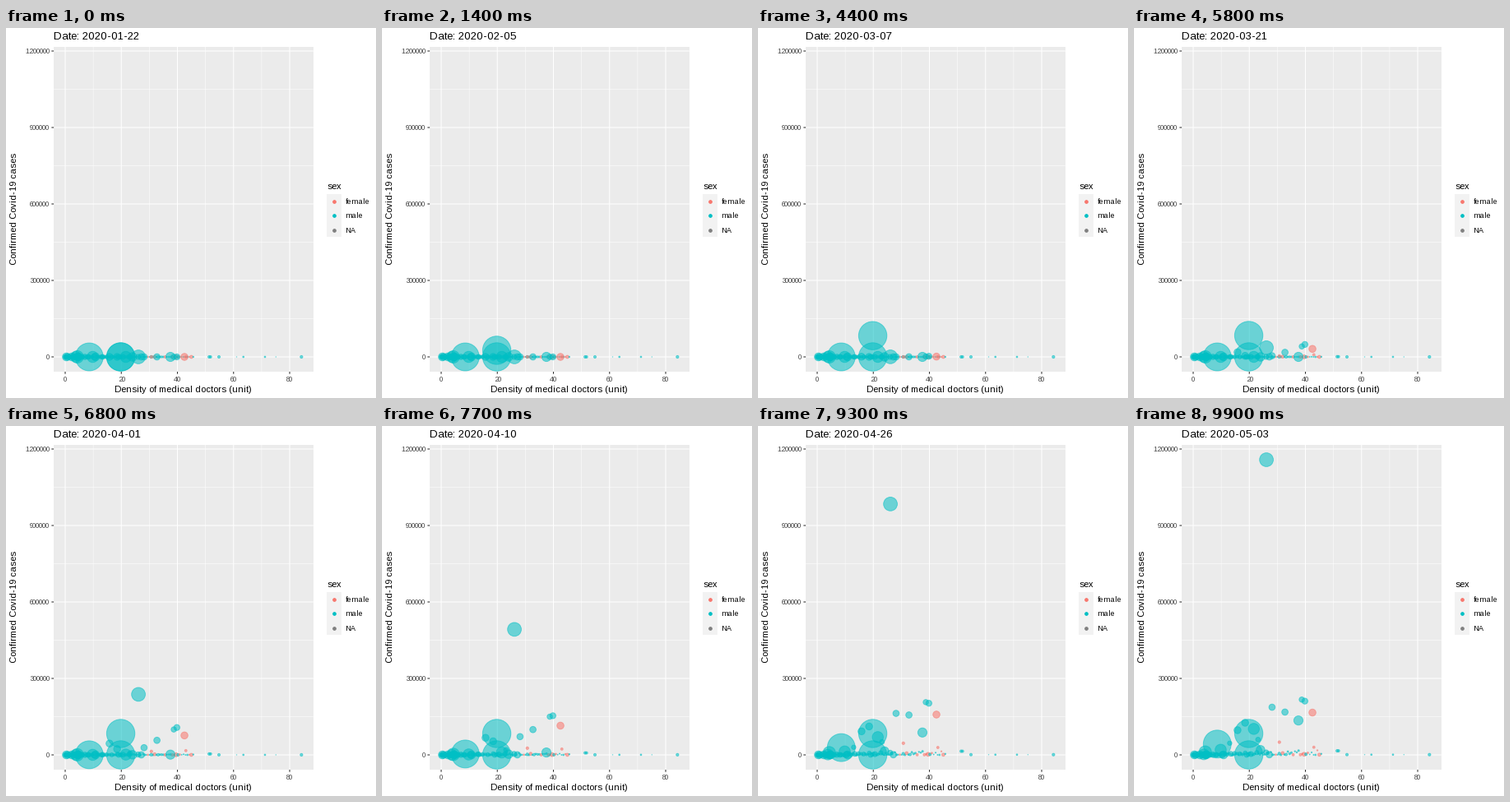
Animation, 450 px wide and 450 px high, one loop 10 s. Source, as a matplotlib script:

```python
import matplotlib.pyplot as plt
import numpy as np
from matplotlib.animation import FuncAnimation
from matplotlib.patches import Rectangle

plt.rcParams["font.family"] = "Liberation Sans"
plt.rcParams["text.hinting_factor"] = 1

FRAMES, LAST_DAY = 100, 102
START = np.datetime64("2020-01-22")
FEMALE, MALE, MISSING = "#F8766D", "#00BFC4", "#7F7F7F"
LEFT, RIGHT, TOP, BOTTOM = 58.1, 373.8, 23, 418
DAYS = np.arange(LAST_DAY + 1)


def wave(peak):
    """Share of the final cases per day: a Gompertz curve, fastest at peak."""
    g = np.exp(-np.exp((peak - DAYS) / (4 + .15 * peak)))
    return g / g[-1]


def ramp(onset, softness=3):
    """Share of the final cases per day: nothing, then a steady climb."""
    g = np.log1p(np.exp((DAYS - onset) / softness))
    return g / g[-1]


# Doctors per 10000, population in millions, final cases in thousands, growth
KEY = [
    (3.8, 196, 2, wave(106)),
    (4.3, 268, 11, wave(95)),
    (8.57, 1353, 42.5, wave(104)),
    (9.8, 212, 20, wave(104)),
    (13, 32, 46, wave(106)),
    (15.8, 82, 97, wave(68)),
    (18.5, 82, 126, wave(81)),
    (19.8, 1393, 0, wave(15)),
    (19.8, 1393, 84, wave(15)),
    (21.6, 209, 102, wave(103)),
    (23.1, 37, 60, wave(86)),
    (24, 126, 20, wave(98)),
    (26.1, 327, 1158, ramp(62)),
    (28.1, 66, 187, wave(83)),
    (32.7, 67, 168, wave(73)),
    (37.5, 144, 135, wave(106)),
    (38.7, 47, 217, wave(68)),
    (39.8, 60, 211, wave(66)),
]
KEY_WOMEN = [
    (30.7, 11, 50, wave(76)),
    (42.5, 83, 166, wave(68)),
    (43, 8.5, 30, wave(64)),
]
FAR = [51.3, 51.8, 54.8, 61.1, 63.5, 71.2, 75.1, 84.2]


def crowd(count, seed=4):
    """Many small bubbles: densest, largest and least affected on the left."""
    rng = np.random.default_rng(seed)
    for u in (np.arange(count) + .5) / count:
        density = 46 * u ** 1.6
        people = 16 * np.exp(rng.normal(0, 1.1) - density / 28)
        final = .5 * density * rng.random() ** 2.5
        woman = density > 28 and rng.random() < .25
        yield (density, min(people, 105), final, wave(rng.uniform(70, 95)),
               FEMALE if woman else MALE)
    for i, density in enumerate(FAR):
        final = 16 if density < 52 else 1
        yield density, (10, 9, 10, .1, 3, 3, .1, 11)[i], final, wave(78), MALE


bubbles = list(crowd(105))
bubbles += [(*b, MALE) for b in KEY] + [(*b, FEMALE) for b in KEY_WOMEN]
density, people, final, growth, colors = zip(*bubbles)
cases = np.array(final)[:, None] * np.array(growth)
radius = .1 + 17.1 * np.sqrt(np.array(people) / 1393)


def px(v):
    return 72 + 3.4125 * np.asarray(v)


def py(thousands):
    return 400 - .31 * np.asarray(thousands)


fig = plt.figure(figsize=(6.25, 6.25), dpi=72, facecolor="white")
ax = fig.add_axes([0, 0, 1, 1])
ax.set_xlim(0, 450)
ax.set_ylim(450, 0)
ax.axis("off")


def rect(x0, y0, x1, y1, color):
    ax.add_patch(Rectangle((x0, y0), x1 - x0, y1 - y0, fc=color, lw=0, zorder=0))


def line(xs, ys, color, width):
    ax.plot(xs, ys, color=color, lw=width, snap=False, zorder=1,
            solid_capstyle="butt")


def text(x, y, s, size, color="black", va="baseline", **kw):
    return ax.text(x, y, s, size=size, color=color, va=va, **kw)


rect(LEFT, TOP, RIGHT, BOTTOM, "#EBEBEB")
for v in range(10, 80, 20):
    line([px(v)] * 2, [TOP, BOTTOM], "white", .53)
for v in range(150, 1200, 300):
    line([LEFT, RIGHT], [py(v)] * 2, "white", .53)
for v in range(0, 81, 20):
    line([px(v)] * 2, [TOP, BOTTOM], "white", 1.07)
    line([px(v)] * 2, [BOTTOM, BOTTOM + 2.74], "#333333", 1.07)
    text(px(v), 429.6, str(v), 9, "#4D4D4D", ha="center")
for v in range(0, 1201, 300):
    line([LEFT, RIGHT], [py(v)] * 2, "white", 1.07)
    line([LEFT - 2.74, LEFT], [py(v)] * 2, "#333333", 1.07)
    text(53.2, py(v) + 3.1, str(v * 1000), 9, "#4D4D4D", ha="right")

title = text(58, 14.2, "", 13)
text(215.5, 443, "Density of medical doctors (unit)", 11, ha="center")
text(10.4, 220.5, "Confirmed Covid-19 cases", 11, ha="center", va="center",
     rotation=90)

rect(390, 202.3, 407.6, 254.2, "#F2F2F2")
text(390, 196, "sex", 11)
for i, (name, color) in enumerate(
        [("female", FEMALE), ("male", MALE), ("NA", MISSING)]):
    y = 211 + 17.28 * i
    ax.scatter([398.8], [y], s=3.7 ** 2, c=color, lw=.94, edgecolors=color)
    text(412.8, y + 3.2, name, 9)

dots = ax.scatter(px(density), py(cases[:, 0]), s=(2 * radius) ** 2, c=colors,
                  edgecolors=colors, lw=.94, alpha=.55, zorder=3)


def update(frame):
    day = frame * LAST_DAY / (FRAMES - 1)
    title.set_text(f"Date: {START + int(day)}")
    dots.set_offsets(np.column_stack([px(density), py(cases[:, round(day)])]))
    return dots, title


anim = FuncAnimation(fig, update, frames=FRAMES, interval=100, repeat=True,
                     repeat_delay=0)
plt.show()
```
